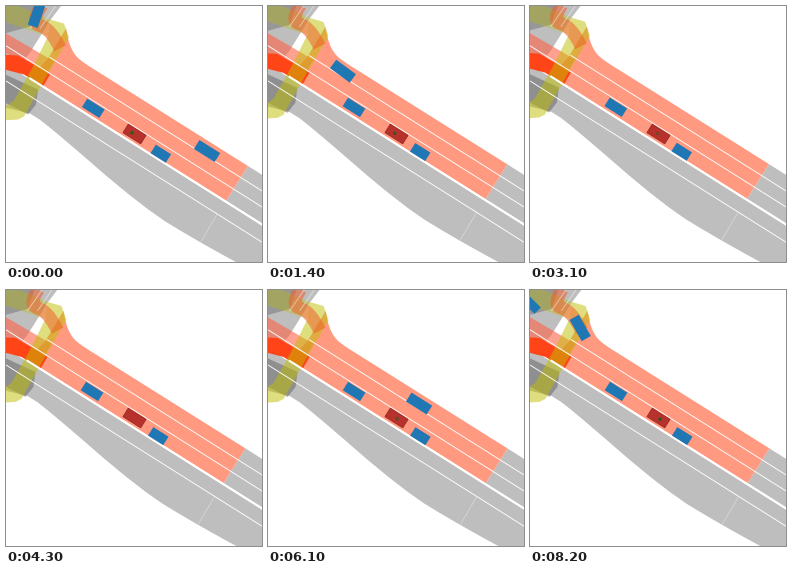
A matplotlib script that plays this animation: 256 px wide and 256 px high, repeating every 8.3 s.

```python
import math

import matplotlib.pyplot as plt
import numpy as np
from matplotlib.animation import FuncAnimation
from matplotlib.patches import Circle, Polygon, Rectangle
from matplotlib.transforms import Affine2D

SIZE, DPI = 256, 100
FRAMES, STEP_MS = 83, 100
PX = 72 / DPI

GRAY, SALMON, BLUE, YELLOW = "#bebebe", "#ff9980", "#1f77b4", "#bfbf00"
ROAD_ANGLE = math.radians(32.2)
ALONG = np.array([math.cos(ROAD_ANGLE), math.sin(ROAD_ANGLE)])
ACROSS = np.array([-ALONG[1], ALONG[0]])
CORNER = np.array([238, 157.5])
LANE = 13.6

fig = plt.figure(figsize=(SIZE / DPI, SIZE / DPI), dpi=DPI, facecolor="white")
ax = fig.add_axes([0, 0, 1, 1])
ax.set_xlim(0, SIZE)
ax.set_ylim(SIZE, 0)
ax.axis("off")

map_shift = Affine2D()
map_transform = map_shift + ax.transData


def road(s, n):
    """Point at distance s along and n across the main road."""
    return CORNER + s * ALONG + n * ACROSS


def area(points, color, alpha=1.0):
    ax.add_patch(Polygon(points, closed=True, fc=color, ec="none", alpha=alpha,
                         transform=map_transform))


def line(points, width, color="white", alpha=1.0):
    x, y = np.transpose(points)
    ax.plot(x, y, color=color, lw=width * PX, alpha=alpha,
            solid_capstyle="butt", transform=map_transform)


def smooth(points, rounds=3):
    """Round the corners of an open polyline."""
    p = np.array(points, float)
    for _ in range(rounds):
        q = 0.75 * p[:-1] + 0.25 * p[1:]
        r = 0.25 * p[:-1] + 0.75 * p[1:]
        p = np.vstack([p[:1], np.stack([q, r], 1).reshape(-1, 2), p[-1:]])
    return p


# Outer lane, bending right into the cross road
TURN = smooth([(330, 226), (197, 142.5), (109, 87), (58, 55), (40, 20),
               (20, 14), (45, -22), (85, -80)])
TURN_S = np.r_[0, np.cumsum(np.hypot(*np.diff(TURN, axis=0).T))]
ENTRY_S = 157


def on_turn(s):
    return np.array([np.interp(s, TURN_S, TURN[:, k]) for k in (0, 1)])


def draw_map():
    # Cross road and lower carriageway
    area([(-9, -9), (56, -9), (40, 12), (20, 44), (-9, 80)], GRAY)
    verge = smooth([(20, 105), (36, 115), (134, 200), (190, 234), (260, 272)], 2)
    area([road(-290, 43), road(60, 43), *verge[::-1], (-9, 98)], GRAY)
    area([road(0, 0), road(60, 0), road(60, 41), road(0, 41)], GRAY)

    # Highlighted carriageway
    kerb = smooth([(56, 20), (59, 35), (65, 47), (74, 54.5), (90, 64.5)])
    area([*kerb, road(0, 0), road(0, 41), road(-231, 41), (38, 50)], SALMON)

    # Lanes through the junction
    area([(-9, -9), (30, -9), (20, 18), (-9, 26)], "#505050", 0.35)
    area([(-9, 64), (28, 81), (26, 96), (18, 106), (-9, 92)], "#505050", 0.42)
    area([(-9, 22), (22, 40), (44, 53), (36, 66), (-9, 42)], "#ff6347", 0.6)
    area([(-9, 46), (8, 47), (22, 55), (40, 66), (33, 78), (14, 66), (-9, 60)],
         "#ff4518")
    line(TURN[TURN[:, 1] < 42], 13, "#f0602c", 0.55)

    # Lane markings
    for n, start, width in ((LANE, -226, 0.9), (2 * LANE, -275, 0.9),
                            (42, -232, 2), (57, -290, 0.9)):
        line([road(start, n), road(60, n)], width)
    line([(207, 206), (191, 233)], 0.6, alpha=0.5)
    for x in (32, 42):
        line([(x - 12, 20), (x + 8, -9)], 0.8, alpha=0.55)

    # Crosswalks
    area([(40, 11), (54, 15), (59, 29), (38, 65), (14, 108), (8, 111),
          (-9, 112), (-9, 101), (4, 92), (22, 60), (38, 28)], YELLOW, 0.5)
    area([(-9, -9), (22, 3), (40, 11), (38, 28), (-9, 12)], YELLOW, 0.35)


def car(length, width, color, edge="none"):
    patch = Rectangle((-length / 2, -width / 2), length, width, fc=color, ec=edge,
                      lw=0.8 * PX, zorder=5)
    ax.add_patch(patch)
    return patch


def place(patch, x, y, angle=ROAD_ANGLE):
    patch.set_transform(Affine2D().rotate(angle).translate(x, y) + ax.transData)


def sway(t):
    """Damped rocking of the view as the centred car settles."""
    return 1.5 + 2.5 * math.exp(-t / 3) * math.cos(2 * math.pi * t / 1.9)


def travel(u):
    """Distance driven: fast approach, braking, speeding up out of the bend."""
    return ENTRY_S + u * (178.9 - 71.8 * u + 13.26 * u * u)


# Entry time and pace of each turning car
TRIPS = [(-2.75, 1), (0, 1), (5.667, 0.84)]

draw_map()
front = car(20.5, 10, BLUE)
rear = car(18, 10, BLUE)
crosser = car(16, 9, BLUE)
movers = [car(24.5, 10.5, BLUE) for _ in TRIPS]
ego = car(21, 10, "#b8322d", "#962a24")
place(ego, 128.5, 128)
dot = Circle((128, 128), 1.8, fc="#2c5a1c", ec="none", zorder=7)
ax.add_patch(dot)


def update(frame):
    t = frame * STEP_MS / 1000
    dx = sway(t)
    dy = dx * math.tan(ROAD_ANGLE)
    map_shift.clear().translate(dx, dy)

    place(front, 85.3 + dx / 2, 101 + dy / 2)
    place(rear, 150.8 + dx, 145.2 + dy)

    for patch, (start, pace) in zip(movers, TRIPS):
        s = travel(pace * (t - start))
        x, y = on_turn(s)
        hx, hy = on_turn(s + 6) - on_turn(s - 6)
        place(patch, x + dx, y + dy, math.atan2(hy, hx))

    # Cross traffic rolls in from the left edge
    gap = 60 * (8.2 - t)
    place(crosser, 2 - gap, 15 - gap, math.pi / 4)

    x = 126 + t / 2
    dot.center = (x, 128 + (x - 128) * 0.6)
    dot.set_alpha(abs(math.cos(math.pi * t / 8.6)))
    return []


anim = FuncAnimation(fig, update, frames=FRAMES, interval=STEP_MS,
                     init_func=lambda: update(0), repeat=True, repeat_delay=0)
plt.show()
```
